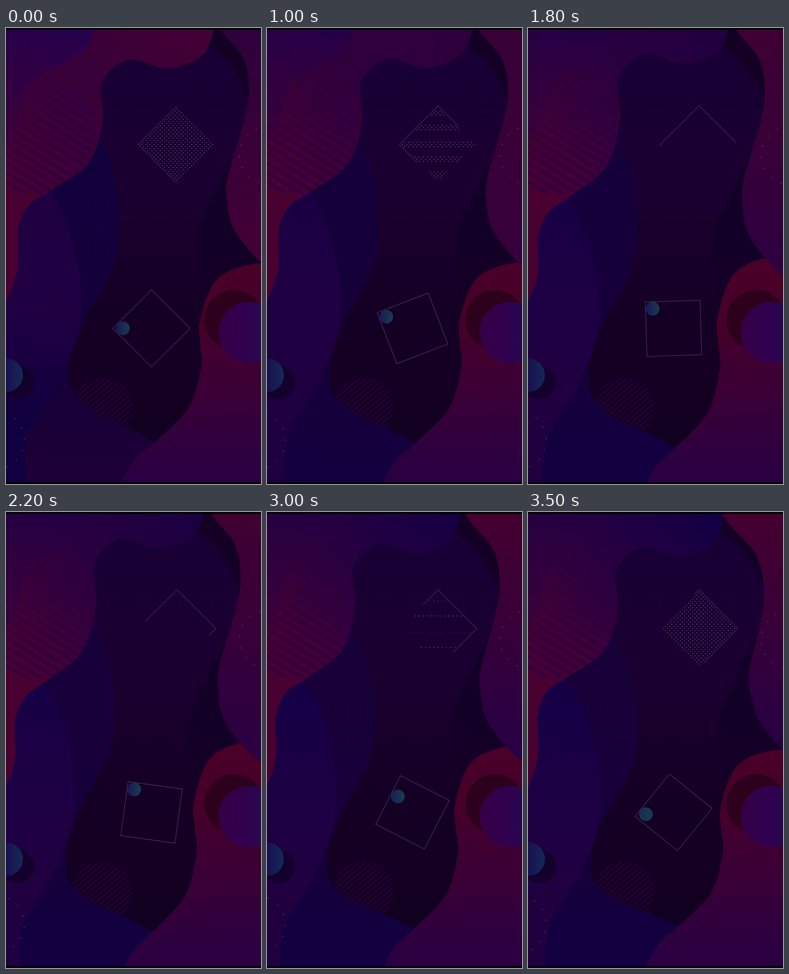
Write an HTML page with a canvas that moves like this. It is 559 px wide and 1002 px high and loops after 3.6 s.

```html
<!DOCTYPE html>
<html lang="en">
<head>
<meta charset="utf-8">
<title>Liquid shapes</title>
<style>
  html, body { margin: 0; width: 100%; height: 100%; overflow: hidden; background: #000; }
  canvas { display: block; width: 100vw; height: 100vh; }
</style>
</head>
<body>
<canvas id="stage" width="559" height="1002"></canvas>
<script>
const ctx = document.getElementById('stage').getContext('2d');
const W = 559, H = 1002, LOOP = 3600, STEP = 100, SPIN = 24;
const rad = deg => deg * Math.PI / 180;
const clamp = v => Math.max(0, Math.min(1, v));
const lerp = (a, b, u) => a + (b - a) * u;

// Time rules shared by all edges, for u from 0 to 1 over the loop.
const swell = u => Math.sin(Math.PI * u ** 2.2);
const bob = u => Math.sin(2.12 * Math.PI * u ** .55);
const glide = u => u ** 1.5;

// Each edge is a curve through a few points, closed by corners off the stage.
// sway (x) and drift (x, y) are given at its head and tail;
// ripple is a vertical wave along it: height, half turns, phase.
const edges = {
  centre: {
    points: [[400, 10], [445, 40], [490, 78], [538, 170], [530, 225], [460, 358], [416, 460], [425, 600]],
    close: [[100, 600], [100, 10]],
    sway: [-22, -18], drift: [[-30, 3], [8, 10]], ripple: [0, 0, 0]
  },
  blue: {
    points: [[190, 215], [232, 310], [247, 425], [233, 525], [165, 655], [143, 720], [139, 768],
             [150, 805], [195, 845], [262, 875], [326, 910], [420, 970]],
    close: [[420, 1010], [-10, 1010], [-10, 215]],
    sway: [-10, -9], drift: [[-5, 45], [5, 0]], ripple: [12, 1, 0]
  },
  violet: {
    points: [[70, 320], [125, 410], [160, 540], [159, 660], [115, 775], [54, 875], [42, 930], [43, 1010]],
    close: [[-10, 1010], [-10, 320]],
    sway: [-12, -14], drift: [[-3, 25], [0, 30]], ripple: [-8, 0, 0]
  },
  topLeft: {
    points: [[458, -4], [432, 58], [355, 89], [270, 69], [211, 118], [212, 205], [180, 298],
             [97, 358], [52, 387], [27, 440], [25, 530], [0, 601]],
    close: [[-10, 601], [-10, -14], [458, -14]],
    sway: [-14, -3], drift: [[-26, 5], [0, 10]], ripple: [15, 2, .5]
  },
  fold: {
    points: [[197, -6], [172, 45], [110, 85], [60, 115], [40, 155], [25, 213], [0, 258]],
    close: [[-10, 258], [-10, -6]],
    sway: [0, 0], drift: [[-14, 0], [0, 0]], ripple: [0, 0, 0]
  },
  bottomRight: {
    points: [[640, 530], [555, 517], [465, 550], [426, 640], [426, 700], [428, 745],
             [400, 835], [326, 910], [285, 945], [248, 1005]],
    close: [[640, 1010]],
    sway: [-19, -8], drift: [[-3, 0], [6, 8]], ripple: [17, 1, 0]
  },
  topRight: {
    points: [[455, -30], [470, 4], [521, 68], [533, 140], [522, 205], [487, 325], [485, 382],
             [500, 442], [559, 514], [640, 570]],
    close: [[640, -30]],
    sway: [0, -42], drift: [[-38, 20], [35, 30]], ripple: [8, 1, 0]
  }
};

function edgePath({ points, close, sway, drift: [head, tail], ripple: [height, turns, phase] }, u) {
  const last = points.length - 1;
  const pts = points.map(([x, y], i) => {
    const s = i / last;
    return [
      x + lerp(...sway, s) * swell(u) + lerp(head[0], tail[0], s) * glide(u),
      y + lerp(head[1], tail[1], s) * glide(u) + height * Math.cos(Math.PI * (turns * s - phase)) * bob(u)
    ];
  });
  const path = new Path2D();
  path.moveTo(...pts[0]);
  for (let i = 0; i < last; i++) {
    const [p, a, b, n] = [pts[Math.max(0, i - 1)], pts[i], pts[i + 1], pts[Math.min(last, i + 2)]];
    path.bezierCurveTo(a[0] + (b[0] - p[0]) / 6, a[1] + (b[1] - p[1]) / 6,
                       b[0] - (n[0] - a[0]) / 6, b[1] - (n[1] - a[1]) / 6, b[0], b[1]);
  }
  close.forEach(p => path.lineTo(...p));
  path.closePath();
  return path;
}

function mix(from, to, u) {
  const part = (hex, i) => parseInt(hex.slice(1 + i * 2, 3 + i * 2), 16);
  return `rgb(${[0, 1, 2].map(i => Math.round(lerp(part(from, i), part(to, i), u)))})`;
}

function gradient(x0, y0, x1, y1, ...stops) {
  const g = ctx.createLinearGradient(x0, y0, x1, y1);
  stops.forEach(([at, color]) => g.addColorStop(at, color));
  return g;
}

function fill(path, style) {
  ctx.fillStyle = style;
  ctx.fill(path);
}

function disc(x, y, r) {
  const path = new Path2D();
  path.arc(x, y, r, 0, Math.PI * 2);
  return path;
}

function stripes(x, y, r, angle, gap, width, style, bounds) {
  ctx.save();
  if (bounds) ctx.clip(bounds);
  ctx.clip(disc(x, y, r));
  ctx.translate(x, y);
  ctx.rotate(rad(angle));
  ctx.fillStyle = style;
  for (let d = -Math.ceil(r / gap) * gap; d < r; d += gap) ctx.fillRect(-r, d - width / 2, 2 * r, width);
  ctx.restore();
}

function dashRing(x, y, turn) {
  ctx.strokeStyle = 'rgba(255,255,255,.38)';
  for (let i = 0; i < 16; i++) {
    const a = rad(turn + i * 22.5);
    ctx.beginPath();
    ctx.arc(x, y, 64, a - .025, a + .025);
    ctx.stroke();
  }
}

// Half of the diamond's outline, travelling clockwise from the bottom corner.
function diamondLine(u) {
  const corner = k => [375 - 85 * Math.sin(k * Math.PI / 2), 256 + 85 * Math.cos(k * Math.PI / 2)];
  const at = s => {
    const k = Math.floor(s), a = corner(k), b = corner(k + 1);
    return [lerp(a[0], b[0], s - k), lerp(a[1], b[1], s - k)];
  };
  const start = 1.93 * u;
  ctx.strokeStyle = 'rgba(255,255,255,.28)';
  ctx.beginPath();
  ctx.moveTo(...at(start));
  for (let k = Math.floor(start) + 1; k < start + 2; k++) ctx.lineTo(...at(k));
  ctx.lineTo(...at(start + 2));
  ctx.stroke();
}

// Dotted diamond whose rows leave and return in a scattered order.
function dots(t) {
  const pitch = 4.6, rows = 17;
  for (let j = -rows; j <= rows; j++) {
    const delay = ((j + 6) * 5 + 370) % 37 / 37;
    const alpha = t < LOOP / 2 ? 1 - clamp((t - 650 - delay * 600) / 40) : clamp((t - 2950 - delay * 480) / 40);
    const reach = rows - Math.abs(j);
    for (let i = -reach; i <= reach; i += 2) {
      fill(disc(375 + i * pitch, 256 + j * pitch, 1), `rgba(255,255,255,${.38 * alpha})`);
    }
  }
}

// Turning square with a ball that rolls from one corner to the next.
function spinner(t) {
  const turn = rad(SPIN * t / 1000), slide = clamp((t - 2200) / 1320) ** 2.3;
  const lx = -63 * (1 - slide), ly = 63 * slide;
  const x = 319 + lx * Math.cos(turn) - ly * Math.sin(turn);
  const y = 660 + lx * Math.sin(turn) + ly * Math.cos(turn);
  ctx.save();
  ctx.translate(319, 660);
  ctx.rotate(turn + Math.PI / 4);
  ctx.strokeStyle = 'rgba(255,255,255,.26)';
  ctx.strokeRect(-60, -60, 120, 120);
  ctx.restore();
  fill(disc(x, y, 15), gradient(x - 15, y, x + 15, y, [0, mix('#1b1655', '#1a2c52', slide)], [1, '#173e50']));
}

function draw(t) {
  const u = t / LOOP;
  const tint = Math.sin(u * Math.PI / 2), quick = clamp(t / 1200);
  const shape = {};
  for (const name in edges) shape[name] = edgePath(edges[name], u);

  ctx.lineWidth = 1;
  ctx.fillStyle = gradient(0, 0, 0, H, [0, '#130024'], [.45, '#130027'], [.62, '#150025'], [.9, '#120020']);
  ctx.fillRect(0, 0, W, H);
  fill(shape.centre, gradient(0, 100, 0, 620, [0, '#190034'], [.5, '#1a0030'], [.8, '#170028'], [1, '#150025']));
  stripes(211, 834, 66, -41, 9, 3.5, '#230036');

  fill(shape.blue, gradient(160, 350, 120, 950,
    [0, mix('#12003c', '#180038', tint)], [.7, '#16003a'], [1, mix('#1c0036', '#120040', quick)]));
  fill(shape.violet, gradient(60, 400, 20, 860,
    [0, mix('#1e0041', '#150046', tint)], [.45, mix('#210042', '#1c0044', tint)], [1, mix('#10003f', '#210040', quick)]));
  fill(disc(25, 779, 37), 'rgba(18,0,40,.85)');
  fill(disc(0, 763, 37), gradient(-10, 0, 38, 0, [0, '#1a0852'], [1, '#142a56']));

  fill(shape.topLeft, gradient(420, 30, 60, 390,
    [0, mix('#420035', '#130044', tint)], [.45, mix('#370039', '#270040', tint)], [.8, '#420033'], [1, '#480030']));
  fill(shape.fold, gradient(40, 0, 10, 258, [0, mix('#26004b', '#250042', tint)], [1, '#3f0036']));
  stripes(65, 235, 130, 32, 17.3, 7,
    gradient(-120, 0, 60, 0, [0, 'rgba(40,0,70,.25)'], [1, 'rgba(40,0,70,.75)']), shape.topLeft);

  fill(shape.bottomRight, gradient(0, 520, 30, 1000, [0, '#4a0029'], [.3, '#460029'], [.6, '#3c0034'], [1, '#2a0041']));
  fill(disc(500, 641, 65), '#2d001b');
  fill(shape.topRight, gradient(0, 10, 0, 520,
    [0, mix('#2e003c', '#440030', tint)], [.45, '#380037'], [1, mix('#420036', '#260044', tint)]));
  fill(disc(533, 669, 67), gradient(466, 0, 600, 0, [0, '#360046'], [.45, '#30004e'], [1, '#1e1052']));

  const turn = SPIN * t / 1000 - 2;
  dashRing(575, 280, turn);
  dashRing(-24, 906, turn);
  diamondLine(u);
  dots(t);
  spinner(t);

  ctx.fillStyle = '#000';
  ctx.fillRect(0, 0, W, 4);
  ctx.fillRect(0, 998, W, 4);
}

const began = performance.now();
function tick() {
  const t = (performance.now() - began) % LOOP;
  draw(Math.floor(t / STEP) * STEP);
  requestAnimationFrame(tick);
}
tick();
</script>
</body>
</html>
```
